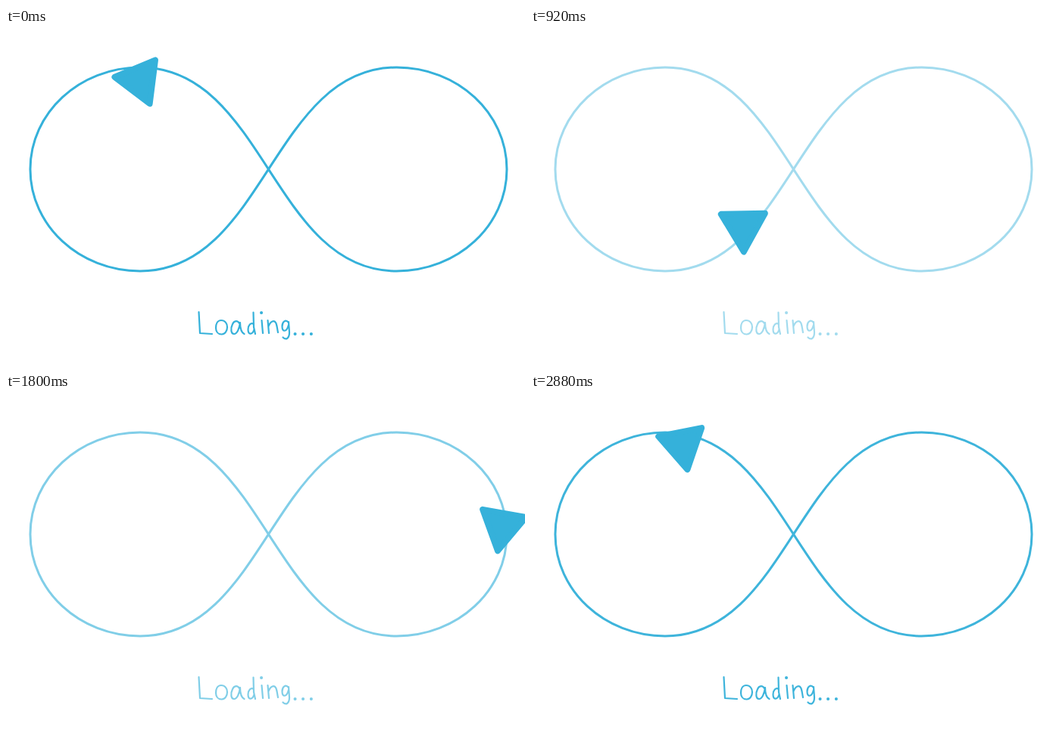
Animation of 685 by 445 pixels, one loop 2920 ms. Source, as an HTML page:

```html
<!DOCTYPE html>
<html lang="en">
<head>
<meta charset="utf-8">
<title>Loading</title>
<style>
  html, body { margin: 0; width: 100%; height: 100%; overflow: hidden; background: #fff; }
  svg { display: block; width: 685px; height: 445px; }
  .line { fill: none; stroke: #35b1da; stroke-linecap: round; stroke-linejoin: round; }
</style>
</head>
<body>
<svg viewBox="0 0 685 445">
  <g id="pulse" class="line">
    <path stroke-width="3" d="M177 52C97 52 32 112 32 186.5S97 321 177 321C341 321 352 52 515.5 52C596 52 661 112 661 186.5S596 321 515.5 321C352 321 341 52 177 52Z"/>
    <g role="img" aria-label="Loading..." stroke-width="2.2">
      <path d="M254.5 375L256 403L272 404"/>
      <path d="M284 386C279 386 277 391 277 396C277 401 280 404.5 284.5 404.5C289 404.5 292 400 292 395C292 390 289 386 284 386Z"/>
      <path d="M308 390C306 386 301 386 299 391C296 397 297 404 301 404C305 404 308 397 309 389C309 396 310 402 314.5 404"/>
      <path d="M327 391C323 388 319.5 393 319.5 398C319.5 405 325 406 327.5 398M326.5 375.5L327 395L329 404"/>
      <path d="M337.5 386L339 403"/>
      <path d="M345.5 386L347 403M346.5 394C349 387 354 385 356.5 390C358 394 358 398 359 402"/>
      <path d="M373 389C369 384 364.5 388 364.5 394C364.5 401 370 403 373 392M373 388L374 402C374 409 370 413 365.5 408.5"/>
      <path stroke-width="4" d="M337 376h.1M381.5 404h.1M392 404h.1M402.8 404h.1"/>
    </g>
  </g>
  <path id="arrow" fill="#35b1da" stroke="#35b1da" stroke-width="8" stroke-linejoin="round" d="M33.5 0L-16.75 29L-16.75 -29Z"/>
</svg>
<script>
const LOOP = 2920;
const TILT = 13;
const arrow = document.getElementById('arrow');
const pulse = document.getElementById('pulse');

// The arrow's own route: two lobes and two crossings, each taking a quarter of the loop.
const legs = [
  'M176.7 69C105 76 41 121 41 183S105 306 177 306',
  'M177 306C343.5 306 347 47.5 510 47.5',
  'M510 47.5C590 47.5 655 107 655 182C655 266 581 331 497 321.5',
  'M497 321.5C348 306 305 48 176.7 69'
].map(d => {
  const path = document.createElementNS('http://www.w3.org/2000/svg', 'path');
  path.setAttribute('d', d);
  return path;
});

// [ms, opacity] of the outline and the lettering
const fades = [[0, 1], [973, .425], [1460, .7], [2470, .47], [LOOP, 1]];

function opacityAt(t) {
  const i = fades.findIndex(fade => fade[0] > t);
  const [t0, a] = fades[i - 1], [t1, b] = fades[i];
  return a + (b - a) * (t - t0) / (t1 - t0);
}

function draw(t) {
  const progress = t / LOOP * legs.length;
  const leg = legs[Math.floor(progress)];
  const distance = progress % 1 * leg.getTotalLength();
  const { x, y } = leg.getPointAtLength(distance);
  const before = leg.getPointAtLength(distance - 1);
  const after = leg.getPointAtLength(distance + 1);
  const heading = Math.atan2(after.y - before.y, after.x - before.x) * 180 / Math.PI;
  arrow.setAttribute('transform', `translate(${x} ${y}) rotate(${heading + TILT})`);
  pulse.setAttribute('opacity', opacityAt(t));
}

const start = performance.now();
function frame() {
  const t = (performance.now() - start) % LOOP;
  draw(Math.floor(t / 40) * 40);
  requestAnimationFrame(frame);
}
draw(0);
requestAnimationFrame(frame);
</script>
</body>
</html>
```
